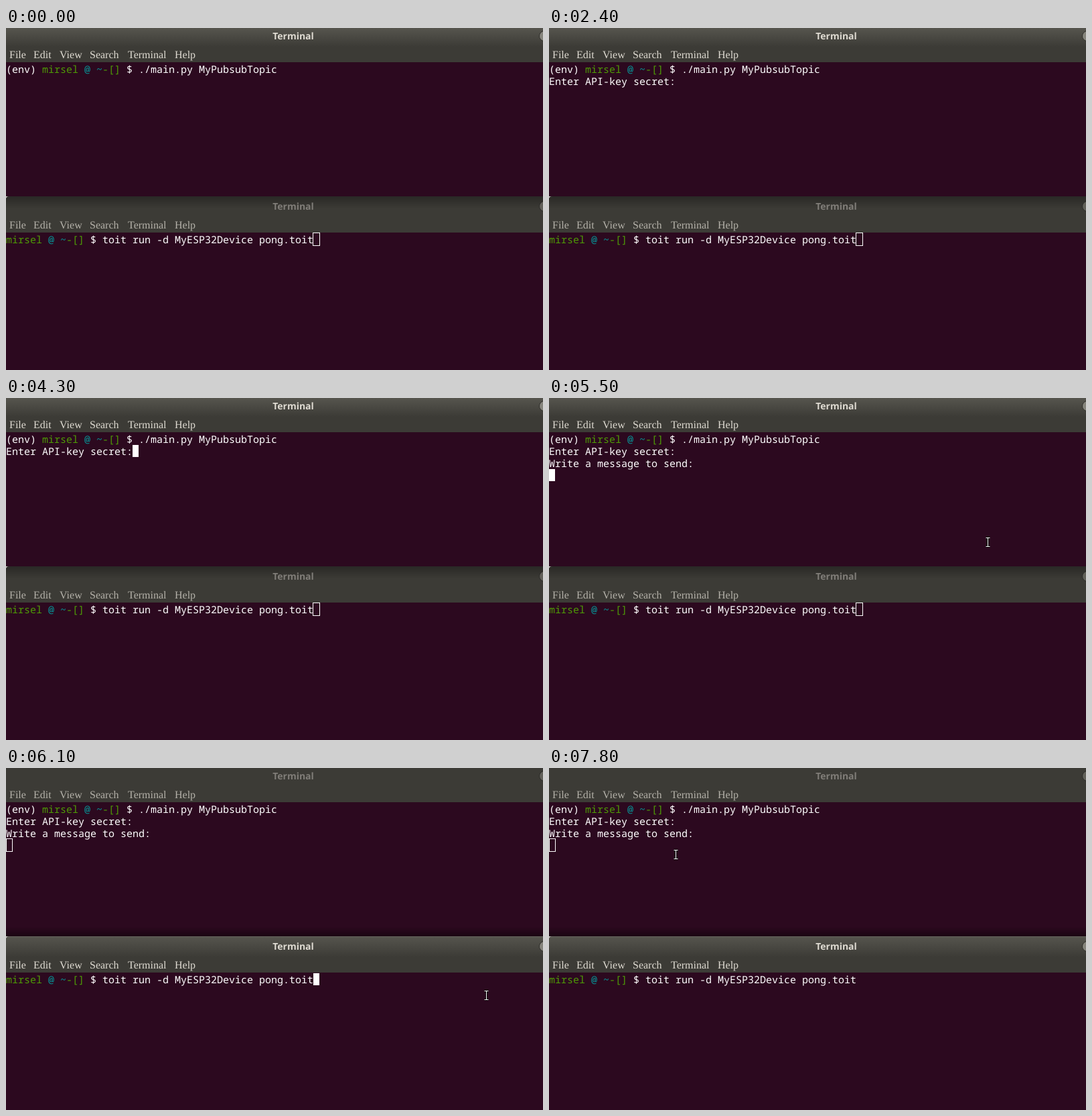
Write an HTML page that moves like this. It is 802 px wide and 510 px high and loops after 8000 ms.

```html
<!DOCTYPE html>
<html lang="en">
<head>
<meta charset="utf-8">
<title>Two terminals</title>
<style>
  html, body { margin: 0; width: 100%; height: 100%; overflow: hidden; background: #2c091f; }
  svg { display: block; width: 802px; height: 510px; }

  text { white-space: pre; text-rendering: geometricPrecision; }
  .mono text { font: 15px "Noto Sans Mono", "DejaVu Sans Mono", monospace; fill: #fff; }
  .menu text { font: 14px "Noto Sans", "Open Sans", sans-serif; }
  .title { font: bold 14px "Noto Sans", "Open Sans", sans-serif; text-anchor: middle; }
  .user { fill: #4e9a06; }
  .path { fill: #06989a; }
  .block { fill: #fff; }
  .hollow { fill: none; stroke: #fff; }

  /* 100 ms is 1.25 % of the loop; every change is a hard one */
  .anim { animation: 8s step-end infinite; }

  .menu { fill: #dfdbd2; }
  .upper .menu { animation-name: menu-dim; }
  .lower .menu { animation-name: menu-lit; }
  .upper .title { animation-name: title-dim; }
  .lower .title { animation-name: title-lit; }
  .upper .glow { animation-name: glow-off; }
  .lower .glow { animation-name: glow-on; }
  @keyframes menu-dim { 0% { fill: #dfdbd2 } 75%, 100% { fill: #b4b1a9 } }
  @keyframes menu-lit { 0% { fill: #b4b1a9 } 75%, 100% { fill: #dfdbd2 } }
  @keyframes title-dim { 0% { fill: #dfdbd2 } 76.25%, 100% { fill: #807d78 } }
  @keyframes title-lit { 0% { fill: #807d78 } 76.25%, 100% { fill: #dfdbd2 } }
  @keyframes glow-off { 0% { opacity: 1 } 76.25%, 100% { opacity: 0 } }
  @keyframes glow-on { 0% { opacity: 0 } 76.25%, 100% { opacity: 1 } }

  .until-raise { animation-name: until-raise; }
  .from-raise { animation-name: from-raise; }
  @keyframes until-raise { 0% { opacity: 1 } 75%, 100% { opacity: 0 } }
  @keyframes from-raise { 0% { opacity: 0 } 75%, 100% { opacity: 1 } }

  .ask-key { animation-name: ask-key; }
  .ask-message { animation-name: ask-message; }
  .unfocused { animation-name: unfocused; }
  @keyframes ask-key { 0% { opacity: 0 } 23.75%, 100% { opacity: 1 } }
  @keyframes ask-message { 0% { opacity: 0 } 56.25%, 100% { opacity: 1 } }
  @keyframes unfocused { 0% { opacity: 0 } 72.5%, 100% { opacity: 1 } }

  .blink-command { animation-name: blink-command; }
  .blink-key { animation-name: blink-key; }
  .blink-message { animation-name: blink-message; }
  .blink-run { animation-name: blink-run; }
  .blink-output { animation-name: blink-output; }
  @keyframes blink-command {
    0%, 8.75%, 23.75%, 100% { opacity: 0 }
    1.25%, 16.25% { opacity: 1 }
  }
  @keyframes blink-key {
    0%, 30%, 50%, 56.25%, 100% { opacity: 0 }
    23.75%, 43.75%, 53.75% { opacity: 1 }
  }
  @keyframes blink-message {
    0%, 61.25%, 72.5%, 100% { opacity: 0 }
    56.25%, 68.75% { opacity: 1 }
  }
  @keyframes blink-run {
    0%, 82.5%, 87.5%, 100% { opacity: 0 }
    75%, 85% { opacity: 1 }
  }
  @keyframes blink-output {
    0%, 95%, 100% { opacity: 0 }
    87.5% { opacity: 1 }
  }

  /* the pointer is an I-beam over text and an arrow over the bars */
  .ibeam { animation-name: ibeam; }
  .arrow { animation-name: arrow; }
  @keyframes ibeam {
    0%, 70%, 85%, 91.25% { transform: translate(-50px, -50px) }
    68.75% { transform: translate(655px, 215px) }
    71.25% { transform: translate(720px, 318px) }
    72.5% { transform: translate(722px, 335px) }
    75%, 90% { transform: translate(717px, 339px) }
    93.75% { transform: translate(470px, 214px) }
    95% { transform: translate(330px, 172px) }
    96.25% { transform: translate(236px, 142px) }
    97.5%, 100% { transform: translate(189px, 129px) }
  }
  @keyframes arrow {
    0%, 71.25%, 93.75%, 100% { transform: translate(-50px, -50px) }
    70% { transform: translate(698px, 272px) }
    91.25% { transform: translate(691px, 304px) }
    92.5% { transform: translate(610px, 262px) }
  }
</style>
</head>
<body>
<svg viewBox="0 0 802 510">
  <defs>
    <linearGradient id="bar" x2="0" y2="1">
      <stop stop-color="#56554e"/><stop offset="1" stop-color="#3c3b36"/>
    </linearGradient>
    <linearGradient id="fall" x2="0" y2="1">
      <stop stop-color="#000" stop-opacity=".3"/><stop offset="1" stop-color="#000" stop-opacity="0"/>
    </linearGradient>
    <linearGradient id="rise" x2="0" y2="1">
      <stop stop-color="#000" stop-opacity="0"/><stop offset="1" stop-color="#000" stop-opacity=".4"/>
    </linearGradient>
    <g id="labels">
      <text x="5" y="45">File</text>
      <text x="41" y="45">Edit</text>
      <text x="80" y="45">View</text>
      <text x="125" y="45">Search</text>
      <text x="182" y="45">Terminal</text>
      <text x="252" y="45">Help</text>
    </g>
  </defs>
  <rect width="802" height="510" fill="#2c091f"/>

  <g class="upper">
    <rect width="802" height="51" fill="#3c3b36"/>
    <rect class="glow anim" width="802" height="28" fill="url(#bar)"/>
    <circle cx="804" cy="12" r="7.5" fill="#62615a" stroke="#2b2a27"/>
    <circle class="glow anim" cx="804" cy="12" r="7" fill="#85847c"/>
    <text class="title anim" x="429" y="17">Terminal</text>
    <g class="menu anim"><use href="#labels"/></g>
    <g class="mono">
      <text y="67">(env) <tspan class="user">mirsel</tspan> <tspan class="path">@ ~</tspan><tspan class="user">-[]</tspan> $ ./main.py MyPubsubTopic</text>
      <text class="ask-key anim" y="85">Enter API-key secret:</text>
      <text class="ask-message anim" y="103">Write a message to send:</text>
    </g>
    <rect class="block blink-command anim" x="405" y="52" width="9" height="18"/>
    <rect class="block blink-key anim" x="189" y="70" width="9" height="18"/>
    <rect class="block blink-message anim" x="0" y="106" width="9" height="18"/>
    <rect class="hollow unfocused anim" x=".5" y="105.5" width="9" height="19"/>
    <rect class="from-raise anim" y="237" width="802" height="14" fill="url(#rise)"/>
  </g>

  <g class="lower" transform="translate(0 254)">
    <rect y="-3" width="802" height="54" fill="#3c3b36"/>
    <g class="glow anim">
      <rect y="-3" width="802" height="31" fill="url(#bar)"/>
      <rect y="-3" width="802" height="1" fill="#66655e"/>
    </g>
    <rect class="until-raise anim" y="-3" width="802" height="18" fill="url(#fall)"/>
    <path d="M0-3h4q-3 0-4 3z" fill="#d8d6d2"/>
    <circle cx="804" cy="12" r="7.5" fill="#62615a" stroke="#2b2a27"/>
    <circle class="glow anim" cx="804" cy="12" r="7" fill="#85847c"/>
    <text class="title anim" x="429" y="17">Terminal</text>
    <g class="menu anim"><use href="#labels"/></g>
    <g class="mono">
      <text y="67"><tspan class="user">mirsel</tspan> <tspan class="path">@ ~</tspan><tspan class="user">-[]</tspan> $ toit run -d MyESP32Device pong.toit</text>
    </g>
    <rect class="hollow until-raise anim" x="458.5" y="51.5" width="10" height="19"/>
    <rect class="block blink-run anim" x="459" y="52" width="9" height="18"/>
    <rect class="block blink-output anim" x="0" y="70" width="9" height="18"/>
  </g>

  <g class="ibeam anim" fill="none">
    <path d="M-2.5-6.5h6M-2.5 6.5h6M.5-6.5v13" stroke="#000" stroke-width="2.6"/>
    <path d="M-2.5-6.5h6M-2.5 6.5h6M.5-6.5v13" stroke="#fff"/>
  </g>
  <path class="arrow anim" d="M.5.5v15.5l3.5-3.3 2.6 5.8 2.6-1.2-2.6-5.6h4.6z" fill="#fff" stroke="#000"/>
</svg>
</body>
</html>
```
